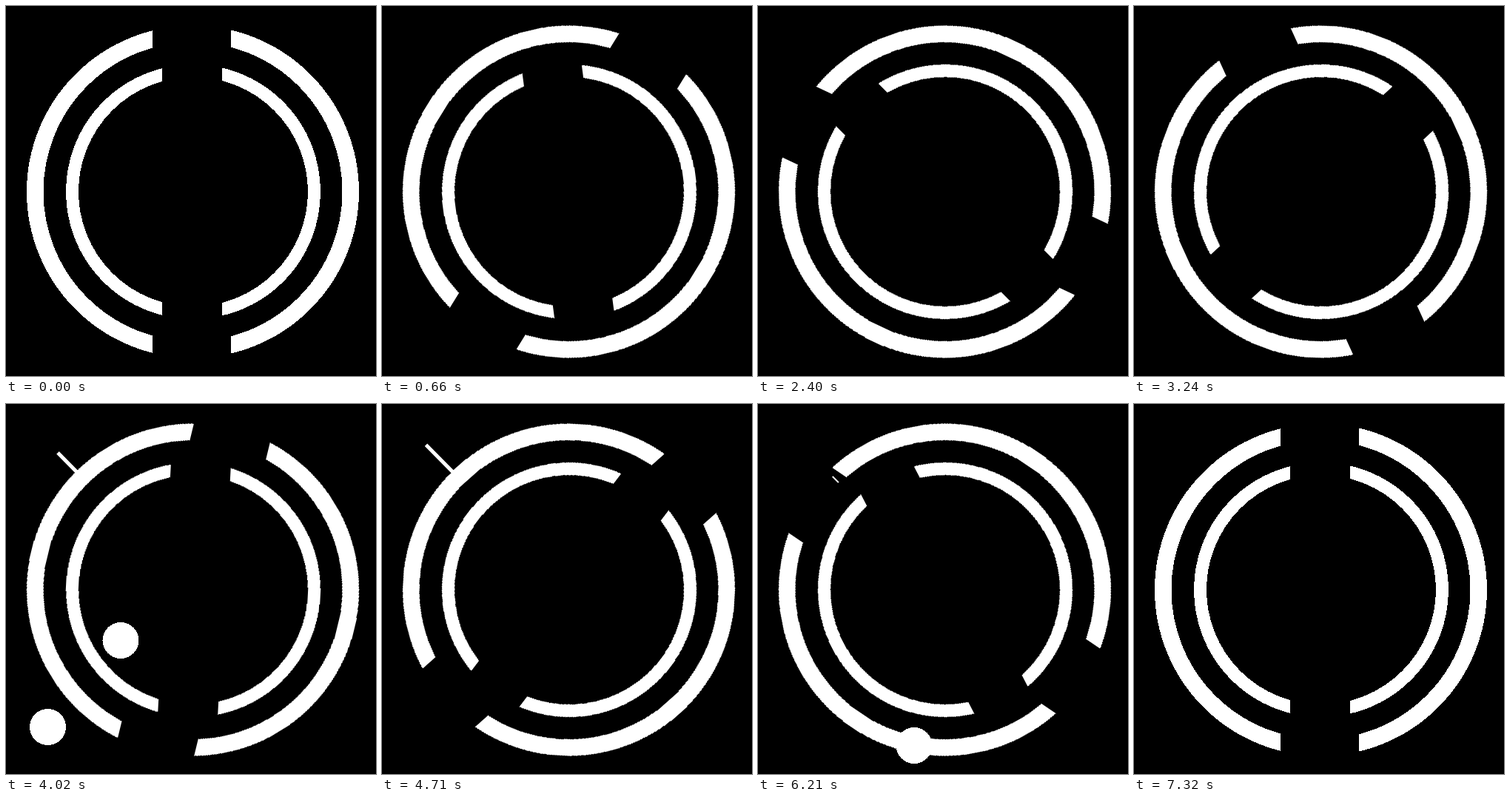
Animation of 500 by 500 pixels, one loop 7350 ms. Source, as an HTML page:

```html
<!DOCTYPE html>
<html lang="en">
<head>
<meta charset="utf-8">
<title>Rings</title>
<style>
  html, body { margin: 0; width: 100%; height: 100%; overflow: hidden; background: #000; }
  svg { display: block; width: 100vw; height: 100vh; fill: #fff; shape-rendering: crispEdges; }
  circle.ring { fill: none; stroke: #fff; }

  .outer, .inner, .bar, .pair, .drop {
    animation: 7350ms linear -2ms infinite;
  }
  .outer { transform-origin: 252.5px 251px; animation-name: outer; }
  .inner { transform-origin: 253px 251px; animation-name: inner; }
  .bar   { transform-origin: 204px 0; animation-name: bar; }
  .pair  { animation-name: pair; animation-timing-function: step-end; }
  .drop  { animation-name: drop; animation-timing-function: step-end; }

  /* One step per 30 ms; the second half turn is slightly faster */
  @keyframes outer {
    0% { transform: rotate(0deg); animation-timing-function: steps(125, end); }
    51.0204% { transform: rotate(180deg); animation-timing-function: steps(119, end); }
    99.5918%, 100% { transform: rotate(360deg); }
  }

  @keyframes inner {
    0% { transform: rotate(0deg); animation-timing-function: cubic-bezier(.36, 0, .64, 1); }
    33.8776% { transform: rotate(-45deg); animation-timing-function: cubic-bezier(.36, 0, .64, 1); }
    51.0204% { transform: rotate(-180deg); animation-timing-function: cubic-bezier(.346, 0, .51, 1); }
    99.5918%, 100% { transform: rotate(0deg); }
  }

  @keyframes bar {
    0%, 51.02% { transform: scale(0, 1); }
    54.694% { transform: scale(.79, 1); }
    56.327%, 79.184% { transform: scale(1, 1); }
    84.49% { transform: scale(.18, .4); }
    84.898%, 100% { transform: scale(0, .4); }
  }

  @keyframes pair {
    0% { opacity: 0; }
    51.4286% { opacity: 1; }
    61.2245%, 100% { opacity: 0; }
  }

  @keyframes drop {
    0% { opacity: 0; }
    82.0408% { opacity: 1; }
    93.8776%, 100% { opacity: 0; }
  }
</style>
</head>
<body>
<svg viewBox="0 0 500 500">
  <defs>
    <clipPath id="outerGap"><path d="M0 0H198V500H0ZM304 0H500V500H304Z"/></clipPath>
    <clipPath id="innerGap"><path d="M0 0H211V500H0ZM292 0H500V500H292Z"/></clipPath>
  </defs>

  <g class="outer">
    <circle class="ring" cx="252.5" cy="251" r="213.25" stroke-width="22.5" clip-path="url(#outerGap)"/>
  </g>
  <g class="inner">
    <circle class="ring" cx="253" cy="251" r="163.5" stroke-width="17" clip-path="url(#innerGap)"/>
  </g>

  <g transform="translate(252.5 251) rotate(225.3)">
    <rect class="bar" x="204" y="-2.5" width="71" height="5"/>
  </g>

  <g class="pair">
    <circle cx="155" cy="319.5" r="24.5"/>
    <circle cx="56.5" cy="436.5" r="24.5"/>
  </g>
  <circle class="drop" cx="211" cy="461.5" r="24.5"/>
</svg>
</body>
</html>
```
